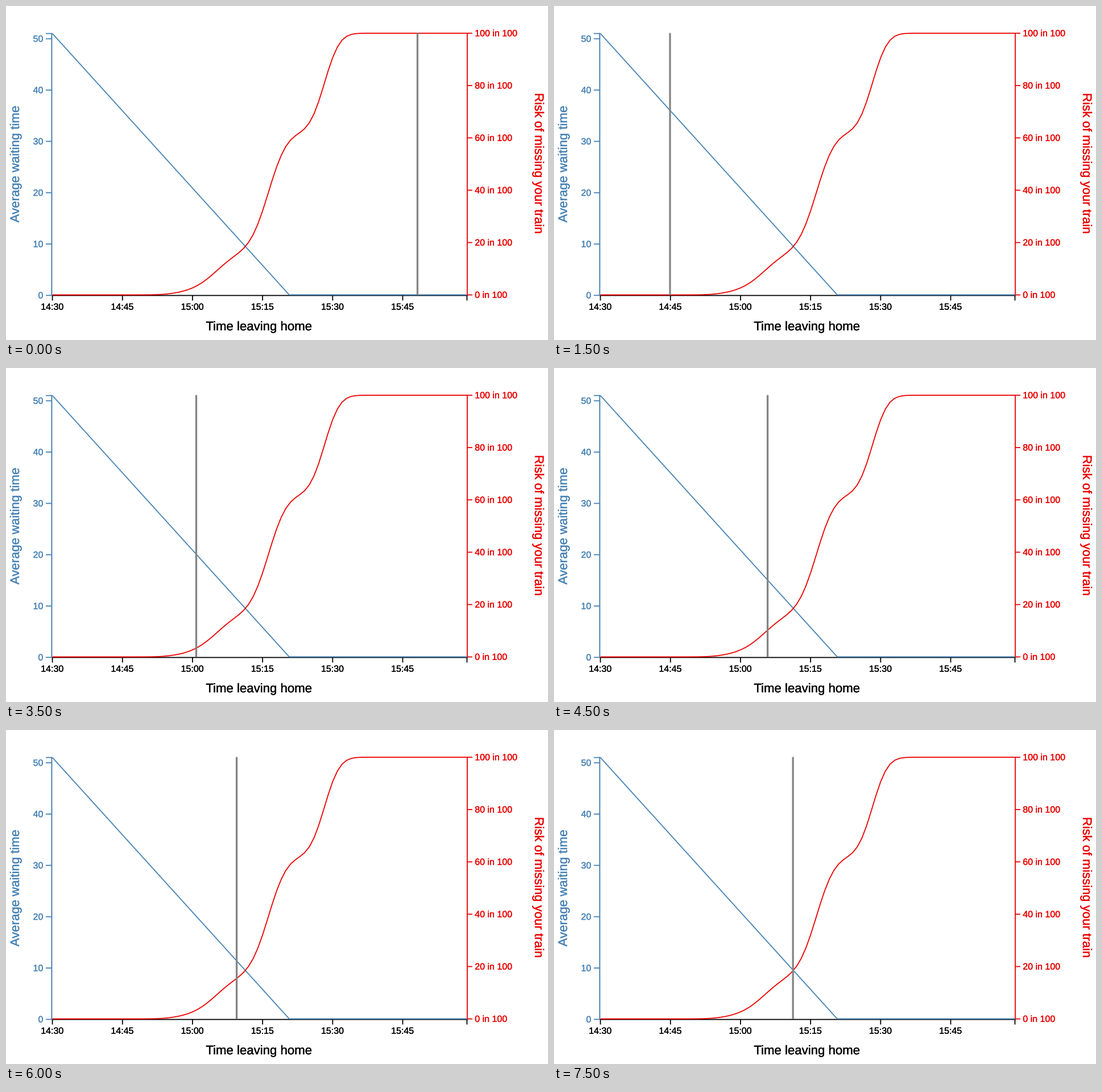
A matplotlib script that plays this animation: 953x588 px, repeating every 8000 ms.

```python
from math import erf, sqrt

import matplotlib.pyplot as plt
import numpy as np
from matplotlib.animation import FuncAnimation
from matplotlib.patheffects import withStroke

W, H, DPI = 953, 588, 64
PT = 72 / DPI  # points per pixel
BLUE, RED, GREY = "#4682b4", "#ec0000", "#848484"
X0, X1 = 81.6, 811
TOP, BASE = 47.9, 508.6
MINUTE = 8.212  # pixels per minute
FRAMES, STEP = 16, 500

plt.rcParams.update({
    "font.family": "Liberation Sans",
    "path.snap": False,
    "text.hinting": "none",
    "toolbar": "None",
})

fig = plt.figure(figsize=(W / DPI, H / DPI), dpi=DPI, facecolor="white")
ax = fig.add_axes([0, 0, 1, 1])
ax.set(xlim=(0, W), ylim=(H, 0))
ax.axis("off")


def line(xs, ys, color, width=1.8, z=2):
    return ax.plot(xs, ys, color=color, lw=width * PT, zorder=z,
                   solid_capstyle="butt", solid_joinstyle="round")[0]


def label(x, y, text, color, size=16, ha="center", angle=0):
    # the thin stroke gives the text a slightly heavier weight
    ax.text(x, y, text, color=color, fontsize=size * PT, ha=ha, va="baseline",
            rotation=angle, rotation_mode="anchor",
            path_effects=[withStroke(linewidth=0.3 * PT, foreground=color)])


def time_x(minutes):
    return X0 + MINUTE * minutes


def wait_y(wait):
    return 509.4 - 9.035 * wait


def risk_y(risk):
    return BASE - (BASE - TOP) * risk / 100


# chance of each delay: weight in percent, mean and spread in minutes
DELAYS = [(1.5, 27, 3), (15.5, 35.2, 3.9), (45, 46.3, 3.1), (38, 58.25, 2.55)]


def risk_at(minute):
    return sum(w / 2 * (1 + erf((minute - mean) / (spread * sqrt(2))))
               for w, mean, spread in DELAYS)


# time axis
line([X0 - 1, X1 + 0.8], [509.6] * 2, "black", z=1)
for m in range(0, 90, 15):
    x = time_x(m)
    line([x, x], [509, 518.5], "black", z=1)
    hour, minute = divmod(14 * 60 + 30 + m, 60)
    label(x - 0.3, 534.8, f"{hour}:{minute:02d}", "black")
line([X1 - 0.5] * 2, [509, 518.5], "black", z=1)
label(444.9, 571, "Time leaving home", "black", 22.2)

# waiting time axis
line([80.4] * 2, [TOP - 0.3, 510], BLUE, 2)
line([70, 81], [48.5] * 2, BLUE)
for wait in range(0, 60, 10):
    y = wait_y(wait)
    line([70, 80], [y, y], BLUE)
    label(65.4, y + 5.4, str(wait), BLUE, ha="right")
label(23, 278.1, "Average waiting time", BLUE, 22.2, angle=90)

# risk axis
line([X1] * 2, [TOP - 0.9, BASE + 0.9], RED)
for risk in range(0, 120, 20):
    y = risk_y(risk)
    line([X1, 820], [y, y], RED)
    label(824.3, y + 5.3, f"{risk} in 100", RED, ha="left")
label(930, 277.4, "Risk of missing your train", RED, 22.2, angle=-90)

# curves
line([X0, 498, X1], [48.5, 508.5, 508.5], BLUE, z=3)
minutes = np.append(np.arange(89), (X1 - X0) / MINUTE)
line(time_x(minutes), [risk_y(risk_at(m)) for m in minutes], RED, z=4)

# marker: quick drag to the left, then a slowing return
KEYS = [(0, 723.5), (0.5, 455), (1, 426.5), (1.5, 204), (2.5, 267.7),
        (3.5, 334.5), (4.5, 375.6), (6, 405.6), (7.5, 420.2)]
key_times, key_xs = zip(*KEYS)
marker = line([key_xs[0]] * 2, [TOP - 0.3, BASE + 0.4], GREY, 3.3, z=5)


def update(i):
    x = np.interp(i * STEP / 1000, key_times, key_xs)
    marker.set_xdata([x, x])
    return (marker,)


anim = FuncAnimation(fig, update, frames=FRAMES, interval=STEP,
                     repeat=True, repeat_delay=0, blit=False)
plt.show()
```
